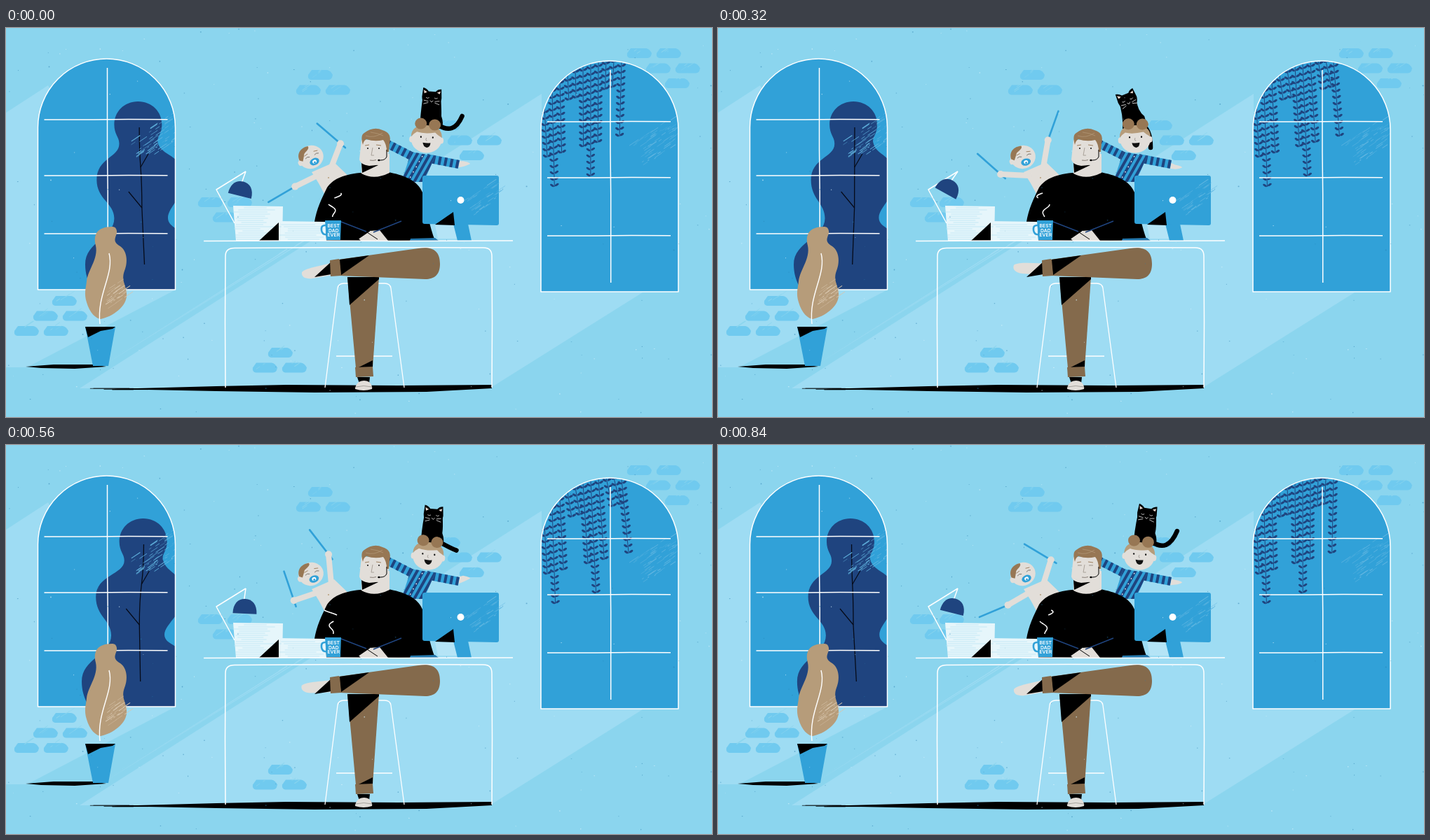
Recreate the animation shown at these times as an HTML page with a canvas. Size 1007 by 556 pixels, loop 0.88 s.

```html
<!DOCTYPE html>
<html lang="en">
<head>
<meta charset="utf-8">
<title>Working from home</title>
<style>
html, body { margin: 0; height: 100%; overflow: hidden; background: #8bd5ee; }
canvas { display: block; width: 100vw; height: 100vh; }
</style>
</head>
<body>
<canvas></canvas>
<script>
const W = 1007, H = 556, LOOP = 880, STEP = 40;
const SKY = '#8bd5ee', BEAM = '#9edcf3', BRICK = '#70caef', BLUE = '#31a1d8', NAVY = '#1f447f',
  SKIN = '#e2ded9', BROWN = '#846a4c', HAIR = '#977754', TAN = '#b69c7a', PALE = '#e6f6fb';
const canvas = document.querySelector('canvas'), c = canvas.getContext('2d');
const dpr = devicePixelRatio || 1;
canvas.width = W * dpr;
canvas.height = H * dpr;

let now = 0, seed = 1;
const random = () => (seed = seed * 16807 % 2147483647) / 2147483647;
const between = (a, b) => a + (b - a) * random();

// Swings around a middle value and is largest at the time `peak`.
const swing = (middle, size, peak, period = LOOP) =>
  middle + size * Math.cos((now - peak) / period * 2 * Math.PI);
// Eases from 0 to 1 between two times.
const ramp = (from, to) => {
  const u = Math.min(1, Math.max(0, (now - from) / (to - from)));
  return u * u * (3 - 2 * u);
};

function fill(path, color) {
  c.fillStyle = color;
  c.fill(new Path2D(path));
}
function line(path, color = '#fff', width = 1.5, dash = []) {
  c.strokeStyle = color;
  c.lineWidth = width;
  c.setLineDash(dash);
  c.stroke(new Path2D(path));
  c.setLineDash([]);
}
function oval(x, y, rx, ry, color, turn = 0) {
  c.fillStyle = color;
  c.beginPath();
  c.ellipse(x, y, rx, ry, turn, 0, 7);
  c.fill();
}
function group(x, y, degrees, draw) {
  c.save();
  c.translate(x, y);
  c.rotate(degrees * Math.PI / 180);
  draw();
  c.restore();
}
function clipped(path, draw) {
  c.save();
  c.clip(new Path2D(path));
  draw();
  c.restore();
}

// Dry-brush strokes scattered along a rising diagonal.
function scratches(x, y, length, spread, count, color) {
  for (let i = 0; i < count; i++) {
    const along = random() * length, across = between(-spread, spread), l = between(2, 16);
    const sx = x + along * .83 + across * .55, sy = y - along * .56 + across * .83;
    line(`M${sx} ${sy}l${l * .83} ${-l * .56}`, color, between(.3, 1.1));
  }
}

// Rows of bricks; `counts` gives the bricks per row, `shift` moves each next row.
function bricks(x, y, counts, shift) {
  counts.forEach((count, row) => {
    for (let i = 0; i < count; i++) {
      const bx = x + row * shift + i * 42, by = y + row * 21.5;
      fill(`M${bx - 12} ${by - 7}h22q5 1 8 7q-1 7 -6 7h-25q-5 -1 -4 -7z`, BRICK);
      scratches(bx - 12, by + 3, 18, 3, 3, SKY);
    }
  });
}

function wall() {
  c.fillStyle = SKY;
  c.fillRect(0, 0, W, H);
  fill('M0 121L60 82L242 374L30 485H0Z', BEAM);
  fill('M764 94L105 515H690L908 378H764Z', BEAM);
  for (let i = 0; i < 4; i++) line(`M${425 - i * 12} ${304 + i * 6}L${165 - i * 8} ${465 + i * 5}`, i % 2 ? SKY : BEAM, 2);
  bricks(448, 67, [1, 2], -17);
  bricks(391, 464, [1, 2], -22);
  bricks(83, 390, [1, 2, 2], -27);
  bricks(903, 36, [2, 2, 1], 27);
  bricks(630, 139, [1, 2, 1], 17);
  bricks(291, 249, [2, 1], 21);
}

function specks() {
  for (let i = 0; i < 200; i++) {
    const dark = random() < .6;
    c.globalAlpha = dark ? .5 : .7;
    oval(random() * W, random() * H, between(.4, 1), between(.4, .9), dark ? '#287ead' : '#d5f1fb');
  }
  c.globalAlpha = 1;
}

function windowPane(x, y, outside) {
  const shape = `M${x} ${y + 330}V${y + 98}A98 98 0 0 1 ${x + 196} ${y + 98}V${y + 330}Z`;
  fill(shape, BLUE);
  clipped(shape, () => {
    outside();
    scratches(x + 136, y + 136, 85, 18, 75, '#62b6e1');
  });
  line(shape);
  line(`M${x + 99} ${y + 13}V${y + 130}l.7 60V${y + 317}`);
  for (const dy of [87, 167, 250]) line(`M${x + 9} ${y + dy}h70l50 -.6l56 .4`);
}

function tree() {
  const head = swing(192, 4, 500), mid = swing(130, 3, 250), low = swing(110, 3, 0),
    waist = swing(152.5, 2.5, 100), right = swing(229, 3, 120);
  fill(`M${head} 105C${head + 20} 105 ${head + 34} 120 ${head + 34} 138C${head + 34} 152 ${head + 27} 155 ${head + 28} 163
    C${head + 32} 182 246 180 252 205C262 235 ${right} 254 ${right} 271C${right} 286 250 285 256 305V380
    H${low + 14}C${low + 4} 365 ${low} 352 ${low} 338C${low} 305 ${waist} 300 ${waist} 272
    C${waist} 250 ${mid} 245 ${mid} 217C${mid} 185 ${head - 25} 185 ${head - 27} 164
    C${head - 27} 156 ${head - 34} 152 ${head - 34} 138C${head - 34} 120 ${head - 20} 105 ${head} 105Z`, NAVY);
  const top = swing(193.5, 3.5, 480), trunk = swing(193, 3, 180), fork = (top + trunk) / 2;
  line(`M${top} 142Q${top} 175 ${fork} 199T${trunk} 257L${swing(194, 3.5, 0)} 338`, '#050a18', 1.3);
  line(`M${trunk} 257l-19 -23M${fork} 199l11 -19`, '#050a18', 1.2);
}

function vines() {
  const sway = swing(.5, .5, 460);
  for (let i = 0; i < 11; i++) {
    const x = 768 + 11 * i, start = 145 - Math.sqrt(98 ** 2 - (x - 861) ** 2),
      end = 165 - 3 * i + 65 * Math.cos((i - 1) * 2 * Math.PI / 5), lean = 4 - .7 * i + sway * 1.5 * i;
    line(`M${x} ${start}L${x + lean} ${end}`, NAVY, 1);
    for (let y = end; y > start; y -= 9) {
      const at = x + lean * (y - start) / (end - start);
      oval(at - 3.4, y - 2, 3.2, 1.6, NAVY, .55);
      oval(at + 3.4, y - 3, 3.2, 1.6, NAVY, -.55);
    }
  }
}

function plant() {
  fill('M28 484L68 481L125 481L143 484L98 487L50 486Z', '#000');
  fill('M113 427H156L146 483H124Z', BLUE);
  fill('M113 427H156L152 430L135 433L117 442Z', '#000');
  fill(`M152 284C130 284 124 295 128 311C132 330 117 345 115 362C114 372 111 379 115 392
    C119 407 129 416 135 416C151 413 174 398 172 379C171 366 164 361 169 347
    C174 335 173 319 163 312C149 304 159 298 158 290Q157 284 152 284Z`, TAN);
  scratches(139, 392, 34, 12, 30, '#d8c6ae');
  line('M147 322C155 352 129 380 134 423', '#fff', 1.4);
}

// The head droops and recovers, is then pushed up by the drumstick and falls back.
function lamp() {
  const droop = now < 440 ? 20 * Math.sin(now / 440 * Math.PI) : 0;
  line('M326 279L300 231L342 205');
  group(342, 205, 14 + droop - 58 * (ramp(480, 760) - ramp(760, 840)), () => {
    line('M0 0L-2 20');
    fill('M-17 36C-17 22 -10 15 0 15S17 22 17 36Z', NAVY);
  });
}

function drumArm(shoulderX, shoulderY, x, y, degrees) {
  group(x, y, degrees, () => line('M0 9V-44', BLUE, 2.6));
  line(`M${shoulderX} ${shoulderY}L${x} ${y}`, SKIN, 8);
  oval(x, y, 5, 5, SKIN);
}

function baby() {
  fill('M436 206L468 192L492 215L460 248L446 222Z', SKIN);
  drumArm(464, 199, swing(470, 10, 110), swing(161, 5, 80), swing(-25, 45, 300));
  drumArm(444, 211, swing(409, 6, 740), swing(220, 11, 750), swing(-68, 56, 490));
  oval(460, 214, 1, 1, TAN);
  group(435, 184.5, swing(-20, 4, 400), () => {
    oval(0, 0, 18, 16.5, SKIN);
    oval(-17, 2, 3.5, 4, SKIN);
    fill('M-17 -2C-17 -13 -8 -18 2 -16C4 -12 -4 -10 -7 -8Q-10 -3 -13 1Z', HAIR);
    line('M-8 -1q3 -2 6 0M6 -1q3 -2 6 0', '#6d665f', .8);
    line('M-8 -5l5 -1M7 -6l5 1', HAIR, .8);
    oval(2, 8, 7, 5, BLUE);
    oval(2, 8, 3, 2.5, '#fff');
    oval(2, 9, 1.5, 1.4, BLUE);
  });
}

function cat() {
  const base = swing(602.5, 10, 710), x = swing(601, 18, 710), y = swing(101, 2, 300);
  line(`M${base + 10} 138Q${swing(631, 14, 740)} ${swing(149, 6, 800)}
    ${swing(638, 21, 750)} ${swing(147, 25, 360)}`, '#000', 6.5);
  fill(`M${base - 16} 144Q${base - 15} 124 ${x - 13} ${y}H${x + 13}Q${x + 14} 118 ${base + 15} 126
    Q${base + 19} 137 ${base + 15} 144Z`, '#000');
  group(x, y, swing(-4, 19, 720), () => {
    fill('M-14 -1L-13 -14Q-8 -13 -5 -9H5Q8 -13 13 -13L14 0Q13 11 0 12T-14 -1Z', '#000');
    fill('M-12 -11L-11 -6L-7 -8ZM12 -10L11 -6L7 -8Z', '#ead8ce');
    line('M-8 0q2 2 4 0M4 0q2 2 4 0M-2 4l2 2l2 -2M-5 5l-6 -1M-5 7l-6 2M5 5l6 -1M5 7l6 2', '#fff', .7);
  });
}

function girl() {
  const hand = swing(195, 4.5, 320, LOOP / 2);
  fill(`M640 190L652 ${hand - 4}Q662 ${hand - 2} 662 ${hand}Q655 ${hand + 4} 641 200Z`, SKIN);
  const sleeves = 'M543 165L586 187M600 186L646 195', torso = 'M578 177L612 183L596 220H564Z';
  line(sleeves, BLUE, 12);
  line(sleeves, NAVY, 12, [4, 4.5]);
  fill(torso, BLUE);
  clipped(torso, () => {
    for (let x = 572; x < 625; x += 9) line(`M${x} 174L${x - 27} 222`, NAVY, 4);
  });
  line('M594 183L574 218', '#fff', 1.4, [1.5, 7]);

  const laughing = now >= 80 && now < 200 || now >= 600 && now < 720;
  group(swing(599, 4.5, 680), 160, swing(2, 5, 680), () => {
    oval(-21, 0, 3.5, 4.5, SKIN);
    oval(21, 0, 3.5, 4.5, SKIN);
    oval(0, 0, 21.5, 18.5, SKIN);
    fill('M-22 -4C-22 -17 -13 -21 0 -21S22 -16 22 -4Q16 -7 12 -11Q-4 -8 -14 -11Q-19 -8 -22 -4Z', TAN);
    oval(-9, -23, 8.5, 8, HAIR);
    oval(11, -22, 8.5, 8, HAIR);
    if (laughing) line('M-11 -3q3 -3 6 0M6 -3q3 -3 6 0', '#333', .8);
    else {
      oval(-8, -4, 1.1, 1.3, '#111');
      oval(9, -4, 1.1, 1.3, '#111');
    }
    line('M0 -3q-2 4 1 4', '#8d8781', .7);
    fill('M-5 4Q1 5 6 4Q6 10 1 11Q-4 10 -5 4Z', '#111');
  });
}

function man() {
  fill(`M505 207C478 210 466 217 458 228C450 244 443 259 440 277V304H612C604 284 600 258 594 235
    C587 217 566 210 545 206Z`, '#000');
  fill('M507 185V208Q525 218 547 207V180Z', SKIN);
  fill('M507 192L531 196L508 207Z', '#000');
  fill('M507 160L504 188Q505 195 518 197Q541 196 545 186L547 160Z', SKIN);
  fill(`M509 167Q505 153 511 150Q524 140 537 146Q551 150 547 165L546 177L543 177Q543 166 538 160
    Q526 163 514 159Q510 161 509 167Z`, HAIR);
  line('M513 154q12 4 24 -4M520 149q10 1 18 5', '#b99f80', .6);
  line('M512 168l6 -1M528 167l7 1', HAIR, .9);
  if (now >= 600) line('M513 172h6M529 172h6', '#8a8078', .8);
  else {
    oval(516, 172, 1, 1.1, '#111');
    oval(532, 172, 1, 1.1, '#111');
  }
  line('M523 171l-2 11h4', '#9b928a', .8);
  line('M519 189q5 1 9 -.5', '#7d736b', .9);
  line('M543 174V184Q541 189 534 189', '#000', 1);
  oval(532, 189, 1.8, 1.3, '#000');
  fill('M503 301L519 290L533 289L545 304H506Z', SKIN);
  line('M503 301L519 290M515 292L530 302', '#000', 1);
  line('M478 277L514 291M564 276L524 292', NAVY, 1.4);
}

function steam() {
  const wisp = (from, to) => {
    let path = '';
    for (let y = from; y >= to; y--) {
      const x = 466 + (272 - y) * .36 * Math.sin(.26 * (270 - y) - .5 - now / LOOP * 2 * Math.PI);
      path += `${path ? 'L' : 'M'}${x} ${y}`;
    }
    line(path);
  };
  wisp(270, 252);
  wisp(243, 236);
}

function deskItems() {
  fill('M324 254L395 255L394 304H328L326 280Z', PALE);
  fill('M388 276L456 277L457 304H388Z', PALE);
  for (let y = 257; y < 303; y += 3) {
    line(`M${between(325, 340)} ${y}H${between(360, 394)}`, '#b5e2f1', .7);
    if (y > 278) line(`M${between(389, 405)} ${y}H${between(425, 456)}`, '#b5e2f1', .7);
  }
  fill('M361 304L389 278V304Z', '#000');

  line('M457 282Q449 281 450 289Q451 296 458 295', BLUE, 2.5);
  fill('M455 275H478L477 303H457Z', BLUE);
  c.fillStyle = '#fff';
  c.font = '600 6.8px Inter, Arial, sans-serif';
  c.textAlign = 'center';
  ['BEST', 'DAD', 'EVER'].forEach((word, i) => c.fillText(word, 467.3, 285 + i * 6.6));

  fill('M577 301L612 300L617 304H576Z', '#2478ad');
  fill('M612 282H641L646 301H616Z', '#b4e4f6');
  fill('M638 280H659L664 304H644Z', BLUE);
  fill('M597 211L700 211Q703 211 703 214V279Q703 282 700 282L597 280Q594 280 594 277V214Q594 211 597 211Z', BLUE);
  fill('M612 281L638 263L640 282Z', '#000');
  scratches(658, 258, 48, 13, 40, '#5db5e0');
  oval(648.5, 246, 5, 5, '#fff');
}

function furniture() {
  fill('M150 516L300 512L400 510L560 511L693 510V515L600 520L440 521L300 519Z', '#000');
  for (let i = 0; i < 10; i++) line(`M${between(115, 190)} ${between(514.5, 517.5)}h${between(30, 80)}`, '#000', .7);
  line('M282 304.5L420 304L560 304.6L723 304');
  line('M313 514L312.5 420L313 326Q313 314.5 326 314.5L500 313.5L681 314Q693 314 693 326L693.5 420L693 514');
  line('M455 514L473 372Q474 365 482 365H540Q548 365 549 372L568 514M471 469H551', '#fff', 1.3);
}

function legs() {
  fill('M487 356H532L523 486H499Z', BROWN);
  fill('M487 356H532V359L490 396Z', '#000');
  fill('M499 487L523 475V487Z', '#000');
  fill('M498 485L523 484L524 498L499 499Z', BROWN);
  fill('M501 499H519L518 508H504Z', '#000');
  fill('M503 506Q511 502 518 506Q523 511 522 516Q510 520 498 516Q498 511 503 506Z', SKIN);
  line('M499 513Q510 510 522 513', '#8b8882', .7);

  group(464, 344, 14 * (ramp(120, 240) - ramp(500, 620)), () =>
    fill('M2 -9C-12 -4 -35 -2 -42 5C-43 12 -37 15 -27 14L2 9Z', SKIN));
  fill('M464 334L440 356L464 352Z', '#000');
  fill('M474 331L588 315C607 312 619 317 619 337C619 353 611 359 598 359L476 354Z', BROWN);
  fill('M476 331L518 325L478 353Z', '#000');
  fill('M462 332L475 330L478 354L463 355Z', BROWN);
}

function draw() {
  seed = 4217;
  c.setTransform(dpr, 0, 0, dpr, 0, 0);
  c.lineCap = 'butt';
  c.lineJoin = 'round';
  wall();
  windowPane(45.5, 44, tree);
  windowPane(763, 47, vines);
  plant();
  lamp();
  c.lineCap = 'round';
  baby();
  cat();
  c.lineCap = 'butt';
  girl();
  man();
  steam();
  deskItems();
  furniture();
  legs();
  specks();
}

function tick(time) {
  now = Math.floor(time % LOOP / STEP) * STEP;
  draw();
  requestAnimationFrame(tick);
}
tick(0);
</script>
</body>
</html>
```
